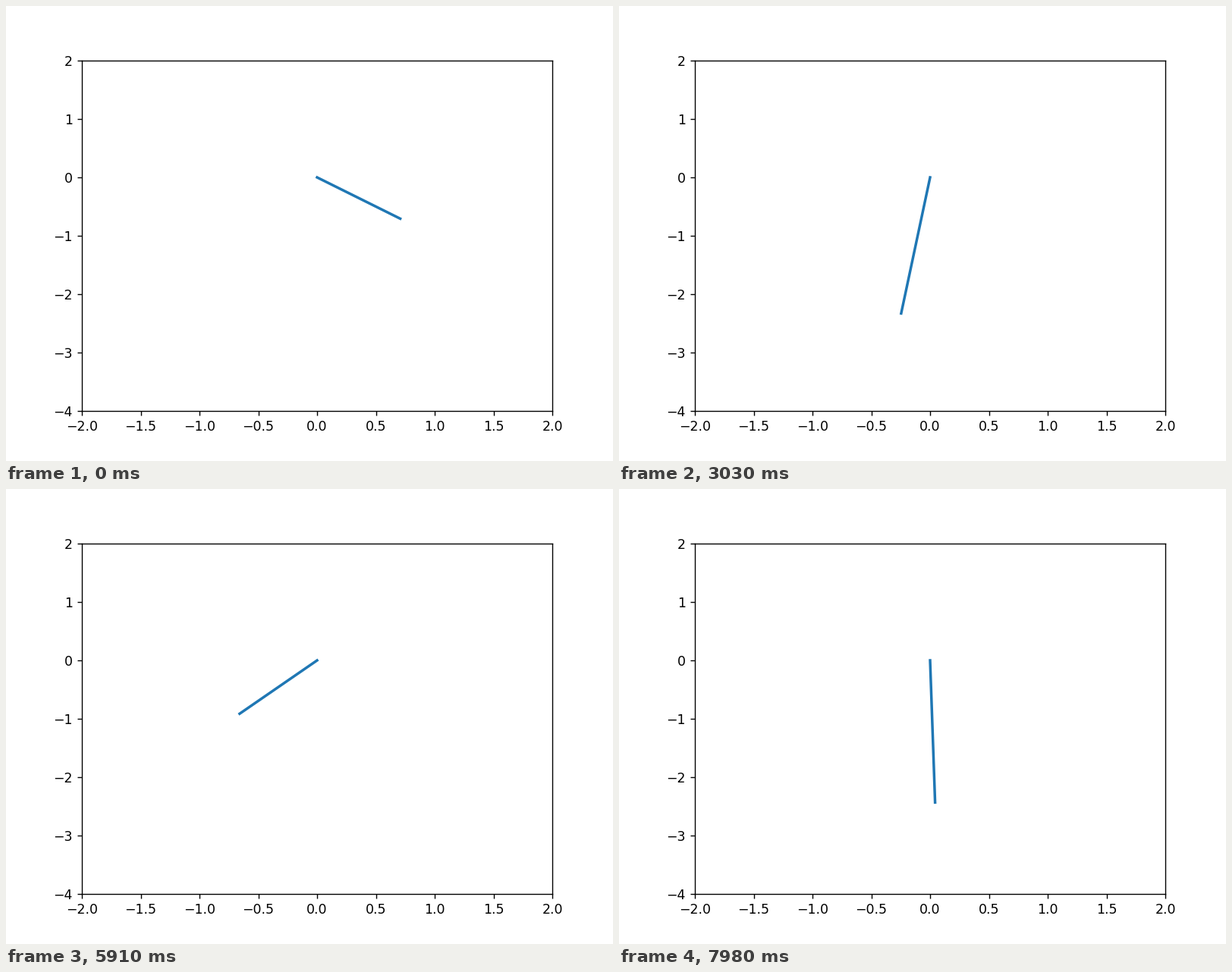
A matplotlib script that plays this animation: 800x600 px, repeating every 8000 ms.

```python
import numpy as np
import matplotlib.pyplot as plt
from matplotlib.animation import FuncAnimation

G = 9.81         # gravity
K = 15.0         # spring stiffness per unit mass
REST = 1.0       # rest length of the spring
DT = 10 / 999    # simulated seconds per frame: 1000 samples over 10 s
FRAMES = 267
INTERVAL = 30


def deriv(s):
    """State is (x, y, vx, vy) of the bob, pivot at the origin."""
    pos, vel = s[:2], s[2:]
    acc = -K * (1 - REST / np.hypot(*pos)) * pos - np.array([0.0, G])
    return np.concatenate([vel, acc])


def rk4(s, h):
    a = deriv(s)
    b = deriv(s + h / 2 * a)
    c = deriv(s + h / 2 * b)
    d = deriv(s + h * c)
    return s + h / 6 * (a + 2 * b + 2 * c + d)


def simulate():
    start = np.pi / 4
    s = np.array([REST * np.sin(start), -REST * np.cos(start), 0.0, 0.0])
    path = [s[:2]]
    for _ in range(FRAMES - 1):
        s = rk4(s, DT)
        path.append(s[:2])
    return np.array(path)


path = simulate()

fig, ax = plt.subplots(figsize=(6.4, 4.8), dpi=125)
ax.set_xlim(-2, 2)
ax.set_ylim(-4, 2)
spring, = ax.plot([], [], lw=2, color="C0")


def update(i):
    x, y = path[i]
    spring.set_data([0, x], [0, y])
    return spring,


def init():
    return update(0)


anim = FuncAnimation(fig, update, frames=FRAMES, init_func=init,
                     interval=INTERVAL, repeat=True, repeat_delay=0)

plt.show()
```
